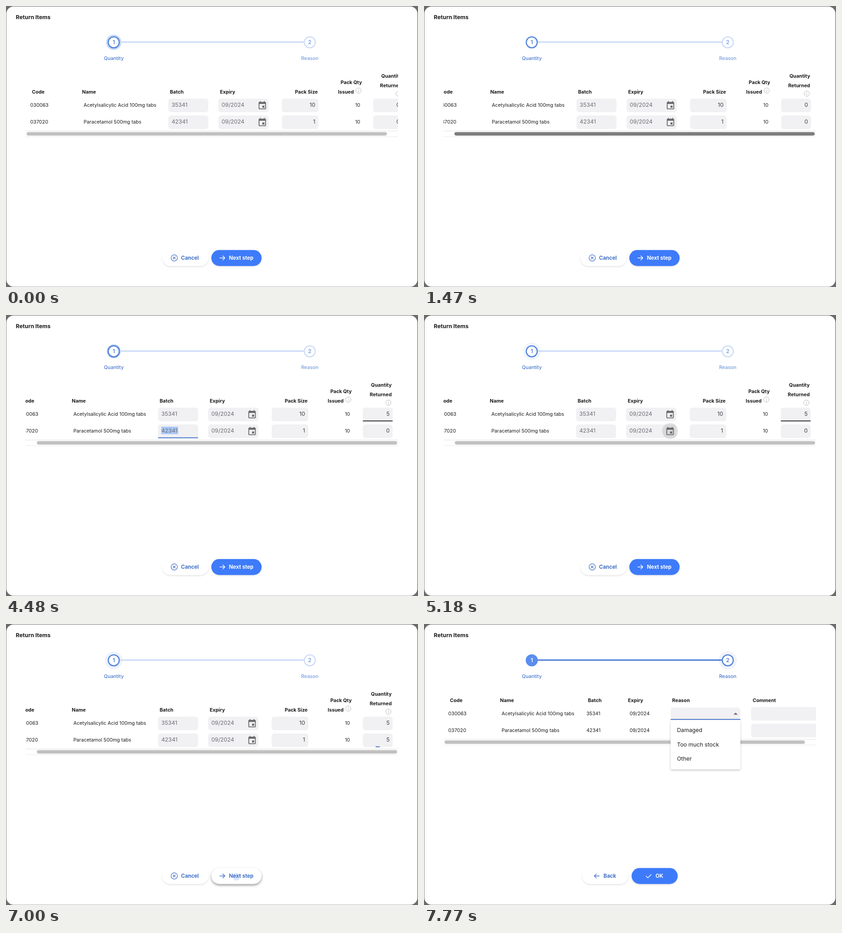
Write an HTML page that moves like this. It is 905 px wide and 619 px high and loops after 8000 ms.

```html
<!DOCTYPE html>
<html lang="en">
<head>
<meta charset="utf-8">
<title>Return Items</title>
<style>
  html, body { margin: 0; width: 100%; height: 100%; overflow: hidden; background: #6c6c6c; }
  svg { display: block; width: 905px; height: 619px; font-family: Inter, "Open Sans", sans-serif; }
  text { white-space: pre; }
</style>
</head>
<body>
<svg id="stage" viewBox="0 0 905 619"></svg>
<script>
const LOOP = 8000;
const STEP_CHANGE = 7140, MENU_OPEN = 7770;
const BLUE = [62, 123, 250], LINK = [67, 114, 200], WHITE = [255, 255, 255];
const INK = '#1c1c20', GREY = '#6c6c74', FIELD = '#f1f1f3', FOCUS = '#4a76cc';
const SMALL = 10.72, MEDIUM = 12.25;

// Halo growth around the active step: start, duration, time it clears, centre x
const pulses = [
  [-400, 750, 560, 236.7],
  [1750, 720, 3850, 236.7],
  [4120, 1200, 5320, 236.7],
  [5800, 1400, STEP_CHANGE, 236.7],
  [STEP_CHANGE, 600, LOOP, 667.3]
];
const items = [
  { code: '030063', name: 'Acetylsalicylic Acid 100mg tabs', batch: '35341', size: '10' },
  { code: '037020', name: 'Paracetamol 500mg tabs', batch: '42341', size: '1' }
];

const clamp = v => Math.max(0, Math.min(1, v));
const ramp = (t, start, length) => clamp((t - start) / length);
const easeOut = v => 1 - (1 - v) ** 3;
const between = (t, a, b) => t >= a && t < b;
const rgb = c => `rgb(${c.map(Math.round)})`;
const mix = (a, b, k) => rgb(a.map((v, i) => v + (b[i] - v) * k));

const rect = (x, y, w, h, fill, rx = 0, extra = '') =>
  `<rect x="${x}" y="${y}" width="${w}" height="${h}" rx="${rx}" fill="${fill}" ${extra}/>`;
const circle = (x, y, r, fill, extra = '') =>
  `<circle cx="${x}" cy="${y}" r="${r}" fill="${fill}" ${extra}/>`;
const line = (d, stroke, width, extra = '') =>
  `<path d="${d}" fill="none" stroke="${stroke}" stroke-width="${width}" ${extra}/>`;

// y is the middle of the capital letters
function label(str, x, y, { size = SMALL, weight = 400, fill = INK, anchor = 'start' } = {}) {
  return `<text x="${x}" y="${y + size * 0.364}" font-size="${size}" font-weight="${weight}" ` +
    `fill="${fill}" text-anchor="${anchor}">${str}</text>`;
}
const heading = (str, x, y, anchor) => label(str, x, y, { weight: 700, anchor });

function fieldBox(x, y, w, h = 30) {
  return rect(x, y, w, h, FIELD, 6);
}

function underline(x, y, w, t, focus, blur) {
  const k = easeOut(ramp(t, focus, 200)) - easeOut(ramp(t, blur, 200));
  return k > 0.005 ? rect(x + w * (1 - k) / 2, y, w * k, 2, FOCUS) : '';
}

const selection = (x, y, w) => rect(x, y - 8.5, w, 16.5, '#a9c8f7');

function infoIcon(x, y) {
  return circle(x, y, 5.8, 'none', 'stroke="#b9b9bd" stroke-width="1"') +
    rect(x - 0.5, y - 0.8, 1, 3.8, '#b0b0b4') + rect(x - 0.5, y - 3, 1, 1.2, '#b0b0b4');
}

function calendar(x, y) {
  return `<path transform="translate(${x - 10.8} ${y - 9.9}) scale(.9)" fill="#68686c" d="M17 12h-5v5h5z` +
    'M16 1v2H8V1H6v2H5c-1.1 0-2 .9-2 2v14c0 1.1.9 2 2 2h14c1.1 0 2-.9 2-2V5c0-1.1-.9-2-2-2h-1V1z' +
    'M19 19H5V8h14z" fill-rule="evenodd"/>';
}

function stepper(t) {
  const done = t >= STEP_CHANGE;
  const active = '#5485dc', idle = '#cfddf7';
  let out = '';
  for (const [start, length, clear, x] of pulses) {
    if (!between(t, start, clear)) continue;
    const p = ramp(t, start, length);
    const alpha = Math.max(0.06, 0.7 * (1 - p));
    out += p < 1
      ? circle(x, 80, 13 + 7 * p, `rgba(74,128,224,${alpha})`)
      : circle(x, 80, 20, '#f1f3f8');
  }
  out += rect(250, 77.8, 404.5, 3.4, done ? '#5b88d8' : idle);
  out += circle(236.7, 80, 12, done ? '#5b8def' : '#fff', `stroke="${done ? '#5b8def' : active}" stroke-width="2.6"`);
  out += circle(667.3, 80, 12, '#fff', `stroke="${done ? active : idle}" stroke-width="2.6"`);
  const number = { size: 12, weight: 600, anchor: 'middle' };
  const caption = { weight: 500, anchor: 'middle' };
  return out +
    label('1', 236.7, 80, { ...number, fill: done ? '#fff' : '#4d7bcf' }) +
    label('2', 667.3, 80, { ...number, fill: done ? '#4d7bcf' : '#7ba1e2' }) +
    label('Quantity', 236.8, 115, { ...caption, fill: '#4777ca' }) +
    label('Reason', 667.2, 115, { ...caption, fill: done ? '#4777ca' : '#759ddf' });
}

function scrollbar(x, top, fill) {
  return rect(43, top, 818, 1, '#e2e2e4') + rect(43, top + 12.5, 818, 1, '#e8e8ea') +
    rect(x, top + 3, 791.5, 7.6, fill, 3.8);
}

function quantityTable(t) {
  const scroll = 14 * ramp(t, 1330, 70) + 7.6 * ramp(t, 1400, 70) + 0.9 * ramp(t, 1480, 130);
  const typed = [t >= 3850, t >= 6020];
  let out = heading('Code', 57, 189) + heading('Name', 167, 189) + heading('Batch', 360, 189) +
    heading('Expiry', 470, 189) + heading('Pack Size', 685, 189, 'end') +
    heading('Pack Qty', 782, 168, 'end') + heading('Issued', 764, 189, 'end') + infoIcon(774.5, 186.3) +
    heading('Quantity', 869.7, 154, 'end') + heading('Returned', 869.7, 175, 'end') + infoIcon(862.4, 193.2);

  items.forEach((item, i) => {
    const y = 218.5 + 37 * i, top = y - 14.5;
    const second = i === 1;
    const muted = { size: MEDIUM, fill: GREY };
    const number = { size: MEDIUM, fill: '#3c3c42', anchor: 'end' };
    out += label(item.code, 53.3, y) + label(item.name, 170.5, y);
    out += fieldBox(356.5, top, 88) + fieldBox(466.5, top, 110.5) + fieldBox(606, top, 80.5) + fieldBox(806.3, top, 65.5);
    if (second) {
      if (between(t, 4290, 4690)) out += selection(363.5, y - 1, 37);
      if (between(t, 4690, 4970)) out += selection(473.5, y - 1, 51);
      if (between(t, 4970, 5390)) out += circle(563, y, 17.5, 'rgba(0,0,0,.1)');
      if (between(t, 5390, 5740)) out += selection(672, y - 1, 8);
      if (between(t, 5740, 6020)) out += selection(856.5, y - 1, 9);
    } else if (between(t, 1960, 3850)) out += selection(856.5, y - 1, 9);

    out += label(item.batch, 363.7, y - 1, muted) + label('09/2024', 473.6, y - 1, muted) + calendar(563, y);
    out += label(item.size, 679.5, y - 1, number) + label('10', 778, y, { anchor: 'end' });
    out += label(typed[i] ? '5' : '0', 865.2, y - 1, number);

    if (second) {
      out += underline(356.5, top + 28.5, 88, t, 4290, 4690) + underline(466.5, top + 28.5, 110.5, t, 4690, 4970) +
        underline(606, top + 28.5, 80.5, t, 5390, 5740) + underline(806.3, top + 28.5, 65.5, t, 5740, 6905);
    } else {
      const hover = ramp(t, 1750, 150) - ramp(t, 6350, 200);
      if (hover > 0) out += rect(806.3, top + 28.5, 65.5, 1.8, INK, 0, `opacity="${hover}"`);
      out += underline(806.3, top + 28.5, 65.5, t, 1960, 4290);
    }
    const typedAt = second ? 6020 : 3850;
    if (between(t, typedAt, typedAt + 430)) out += rect(864, y - 8.5, 1, 15, INK);
  });

  const thumb = between(t, 1190, 1610) ? '#7d7d7d' : between(t, 1120, 1190) ? '#a5a5a5' : '#c1c1c1';
  return `<g clip-path="url(#table)"><g transform="translate(${-scroll} 0)">${out}</g></g>` +
    scrollbar(45.2 + scroll, 274.8, thumb);
}

function arrow(x, y, up) {
  const s = up ? -1 : 1;
  return `<path d="M${x - 4.6} ${y - 2.3 * s}h9.2l-4.6 ${4.6 * s}z" fill="#68686c"/>`;
}

function reasonTable(t) {
  const open = t >= MENU_OPEN;
  let out = '';
  const columns = { Code: 57, Name: 167, Batch: 360, Expiry: 448, Reason: 545, Comment: 722 };
  for (const [title, x] of Object.entries(columns)) out += heading(title, x, 168);
  items.forEach((item, i) => {
    const y = 197.5 + 37 * i;
    out += label(item.code, 53.3, y) + label(item.name, 170.5, y) + label(item.batch, 356.7, y) + label('09/2024', 451.7, y);
    out += fieldBox(541.7, y - 13.5, 153.3, 27) + arrow(684.5, y, open && i === 0) + fieldBox(718.5, y - 14.7, 160);
  });
  if (between(t, 7560, MENU_OPEN)) out += rect(541.7, 209.2, 153.3, 1.8, INK);
  out = `<g clip-path="url(#table)">${out}</g>` + scrollbar(45.2, 253.5, '#c1c1c1');
  if (open) {
    out += rect(541.7, 211, 153.3, 109.3, '#fff', 3, 'style="filter:drop-shadow(0 2px 2px rgba(0,0,0,.22))"') +
      rect(541.7, 209.2, 153.3, 2, FOCUS);
    ['Damaged', 'Too much stock', 'Other'].forEach((name, i) => {
      out += label(name, 555.7, 233.3 + 31.8 * i, { size: MEDIUM });
    });
  }
  return out;
}

function pill(x, w, fill, hover = 0) {
  const shadow = `drop-shadow(0 ${2.5 + hover}px ${1.5 + hover}px rgba(0,0,0,${0.1 + 0.22 * hover}))` +
    (hover ? ` drop-shadow(0 2px 3px rgba(0,0,0,${0.08 * hover}))` : '');
  return rect(x, 537.5, w, 35.2, fill, 17.6, `style="filter:${shadow}"`);
}

const stroke = (d, color) => line(d, color, 1.4, 'stroke-linecap="round" stroke-linejoin="round"');
const buttonText = (str, x, fill) => label(str, x, 555, { size: 11.5, weight: 700, fill });

function buttons(t) {
  const hover = ramp(t, 6580, 200) - ramp(t, 7330, 200);
  const fill = mix(BLUE, WHITE, hover), ink = mix(WHITE, LINK, hover), link = rgb(LINK);
  if (t >= STEP_CHANGE) {
    return pill(347, 102, '#fff') + stroke('M385 555h-11m4.5-4.5l-4.5 4.5 4.5 4.5', link) + buttonText('Back', 394.3, link) +
      pill(456, 101.3, fill, hover) + stroke('M488 555.5l3.7 3.7 7.3-7.5', ink) + buttonText('OK', 508.5, ink);
  }
  let out = pill(343, 102, '#fff') +
    circle(369.6, 555, 6.9, 'none', `stroke="${link}" stroke-width="1.3"`) +
    stroke('M367.3 552.7l4.6 4.6m0-4.6l-4.6 4.6', link) + buttonText('Cancel', 384.4, link) +
    pill(451, 110.5, fill, hover);
  if (t > 6905) {
    out += `<g clip-path="url(#next)">${circle(506, 557, (t - 6905) * 0.085, '#dbe7fc')}</g>`;
  }
  return out + stroke('M469.7 555h11m-4.5-4.5l4.5 4.5-4.5 4.5', ink) + buttonText('Next step', 489.8, ink);
}

const defs = `<defs><clipPath id="table">${rect(43, 140, 818, 200, '#000')}</clipPath>` +
  `<clipPath id="next">${rect(451, 537.5, 110.5, 35.2, '#000', 17.6)}</clipPath></defs>`;
const stage = document.getElementById('stage');

function render(t) {
  stage.innerHTML = defs + rect(0, 0, 905, 619, '#6c6c6c') + rect(0.8, 1, 903, 617.4, '#fff', 16) +
    label('Return Items', 21.6, 25, { size: MEDIUM, weight: 700 }) +
    stepper(t) + (t < STEP_CHANGE ? quantityTable(t) : reasonTable(t)) + buttons(t);
}

const begin = performance.now();
function tick() {
  render((performance.now() - begin) % LOOP);
  requestAnimationFrame(tick);
}
tick();
</script>
</body>
</html>
```
